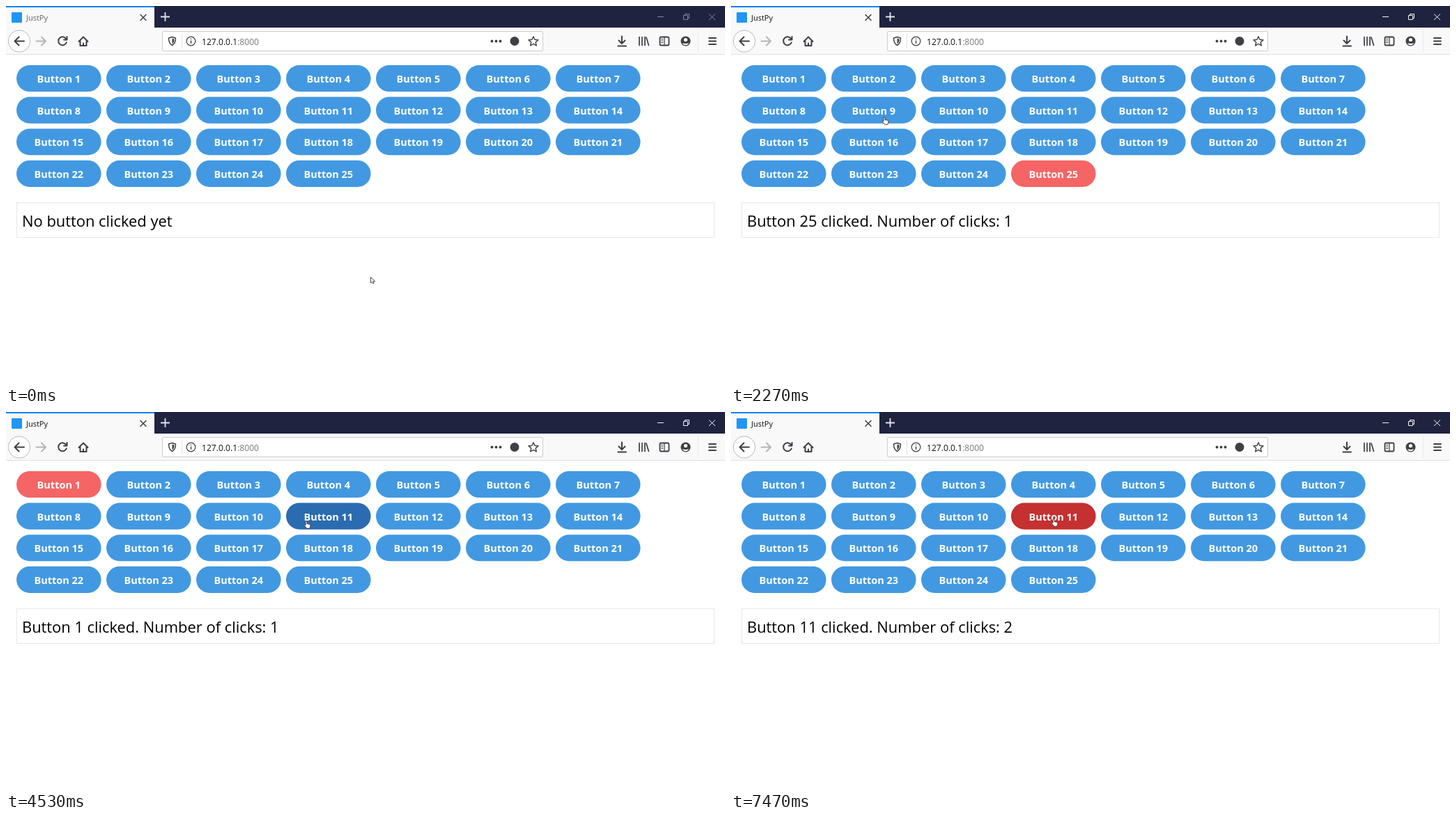
Write an HTML page that moves like this. It is 1032 by 543 pixels and loops after 8 s.

```html
<!DOCTYPE html>
<html lang="en">
<head>
<meta charset="utf-8">
<title>Buttons</title>
<style>
  html, body { margin: 0; width: 100%; height: 100%; overflow: hidden; background: #fff; }
  svg { display: block; width: 1032px; height: 543px; font-family: "Open Sans", "Noto Sans", sans-serif; }
  .icon { fill: none; stroke: #3f3f44; stroke-width: 2; stroke-linecap: round; stroke-linejoin: round; }
  .thin { stroke-width: 1.4; }
  .solid { fill: #3f3f44; }
  #buttons text { font-size: 14.5px; font-weight: 700; fill: #fff; text-anchor: middle; }
</style>
</head>
<body>
<svg viewBox="0 0 1032 543">
  <!-- tab strip -->
  <rect width="1032" height="31" fill="#202340"/>
  <rect width="213" height="31" fill="#f9f9fa"/>
  <rect width="213" height="2" fill="#0a84ff"/>
  <rect x="8" y="9" width="15" height="15" rx="1" fill="#2196f3"/>
  <text id="title" x="29" y="20.5" font-size="11">JustPy</text>
  <path class="icon" stroke-width="1.6" d="M193 12.5l8 8m0-8l-8 8" style="stroke-width:1.5"/>
  <path d="M222 15.5h13m-6.5-6.5v13" stroke="#e4e4ea" stroke-width="1.8"/>
  <g id="controls" fill="none">
    <path d="M935 15.5h9M1009 11.500l9 8.500m0-8.500l-9 8.500"/>
    <path d="M972.500 13.500h6v6h-6zM974.500 13.500v-2h6v6h-2"/>
  </g>

  <!-- toolbar -->
  <rect y="31" width="1032" height="38" fill="#f9f9fa"/>
  <path d="M0 69.500h1032" stroke="#e1e1e2"/>
  <circle cx="19" cy="50.500" r="15.700" fill="#fff" stroke="#b9b9bb"/>
  <path class="icon" d="M26 50.500H12.500m6-6l-6 6 6 6"/>
  <path class="icon" d="M43.500 50.500H57m-6-6l6 6-6 6" style="stroke:#b5b5b7"/>
  <path class="icon" d="M86.500 47.500a6 6 0 1 0 .3 5M87.500 44v4.500h-4.500"/>
  <path class="icon" d="M104.500 51l6.500-6.500 6.500 6.500M106.500 50v7h9v-7M111 57v-3.500"/>
  <rect x="224.500" y="36.500" width="546" height="28" rx="1.500" fill="#fff" stroke="#cccccf"/>
  <path class="icon thin" d="M238.500 44.500l5 1.500c0 5-1 8.500-5 10.500-4-2-5-5.500-5-10.500z"/>
  <path class="solid" d="M238.500 46.500l3 1c0 3.500-.7 5.500-3 7z"/>
  <path d="M252.500 40v21" stroke="#e3e3e5"/>
  <circle class="icon thin" cx="265.500" cy="50.500" r="6.300" style="stroke-width:1.200"/>
  <path class="icon thin" d="M265.500 50v3.500M265.500 47.300v.1"/>
  <text x="281" y="55.500" font-size="12.100" fill="#111">127.0.0.1<tspan fill="#77777b">:8000</tspan></text>
  <g class="solid">
    <circle cx="697.500" cy="50.500" r="1.900"/><circle cx="703.500" cy="50.500" r="1.900"/><circle cx="709.500" cy="50.500" r="1.900"/>
    <circle cx="730" cy="50.500" r="6.500"/>
  </g>
  <path class="icon thin" d="M757 43.800l2 4.500 5 .5-3.800 3.300 1.100 4.900-4.300-2.600-4.300 2.600 1.100-4.900-3.800-3.300 5-.5z"/>
  <path class="icon" d="M884 43.500v10m-4.500-4l4.500 4.500 4.500-4.500M878.500 57.500h11.500"/>
  <path class="icon" d="M909 44.500v12M913 44.500v12M917 44.500v12M919 45l3.500 11.500" style="stroke-width:1.700"/>
  <rect class="icon thin" x="938.500" y="44.500" width="13" height="12" rx="2" style="stroke-width:1.800"/>
  <path class="icon thin" d="M945 45v11M940.800 47.500h2M940.800 50h2M940.800 52.500h2" style="stroke-width:1.200"/>
  <circle class="solid" cx="975.500" cy="50.500" r="7"/>
  <circle cx="975.500" cy="48.500" r="2.600" fill="#f9f9fa"/>
  <path d="M970.800 53.200q4.700 1.600 9.400 0-1.500 3-4.700 3t-4.700-3z" fill="#f9f9fa"/>
  <path d="M993.500 35v31" stroke="#e9e9ea"/>
  <path class="icon" d="M1009 46h10M1009 50.500h10M1009 55h10" style="stroke-width:1.800"/>

  <!-- page -->
  <g id="buttons"></g>
  <rect x="15.500" y="282.500" width="1001" height="50" fill="#fff" stroke="#e6e8ec"/>
  <text id="result" x="23" y="317" font-size="21.900" fill="#000"></text>

  <g id="cursor" fill="#fff" stroke="#222" stroke-width=".8" stroke-linejoin="round">
    <path id="arrow" d="M.5 .5v8.500l2-1.800 1.300 2.600 1.300-.6-1.200-2.600h2.600z"/>
    <path id="hand" d="M-1 1q1-1.300 2 0v3.500l4 .8q1 .3 1 1.500c0 2-.8 2.500-1 4.500h-4.500c-.5-2-2.800-3-3.500-5 .5-1 1.300-.6 2 .4z"/>
  </g>
</svg>

<script>
const LOOP = 8000, FPS = 15, COUNT = 25, COLS = 7;
const LEFT = 15, TOP = 85, STEP_X = 129, STEP_Y = 45.6, WIDTH = 121.6, HEIGHT = 38.1;
const BLUE = ['#4299e1', '#2b6cb0'], RED = ['#f56565', '#c53030'];  // [idle, hovered]
const $ = id => document.getElementById(id);

const smooth = u => u * u * (3 - 2 * u);
const linear = u => u;
const out = u => 1 - (1 - u) ** 2;

// Pointer tip: [tick, x, y, easing into this point]
const path = [
  [4, 523, 389], [15, 465, 251, smooth], [17, 464, 247, out],
  [29, 464, 247], [34, 220, 159, linear], [42, 113, 96, out], [44, 114.5, 102.5, linear],
  [57, 114.5, 102.5], [68, 431, 156, smooth],
  [79, 431, 156], [87, 556, 148, smooth],
  [98, 556, 148], [106, 462.5, 153, smooth]
];
const clicks = [[23, 25], [49, 1], [74, 11], [95, 12], [112, 11]];  // [tick, button]
const FOCUS_TICK = 20;

const buttons = Array.from({ length: COUNT }, (_, i) => {
  const x = LEFT + i % COLS * STEP_X, y = TOP + Math.floor(i / COLS) * STEP_Y;
  $('buttons').insertAdjacentHTML('beforeend',
    `<rect x="${x}" y="${y}" width="${WIDTH}" height="${HEIGHT}" rx="${HEIGHT / 2}"/>` +
    `<text x="${x + WIDTH / 2}" y="${y + 25}">Button ${i + 1}</text>`);
  return $('buttons').lastChild.previousSibling;
});

function pointer(tick) {
  const i = path.findIndex(p => p[0] >= tick);
  if (i < 0) return path[path.length - 1].slice(1, 3);
  if (i === 0) return path[0].slice(1, 3);
  const [t0, x0, y0] = path[i - 1], [t1, x1, y1, ease = linear] = path[i];
  const u = ease((tick - t0) / (t1 - t0));
  return [x0 + (x1 - x0) * u, y0 + (y1 - y0) * u];
}

function buttonAt([x, y]) {
  const col = Math.floor((x - LEFT) / STEP_X), row = Math.floor((y - TOP) / STEP_Y);
  const inside = col >= 0 && col < COLS && row >= 0 &&
    x - LEFT - col * STEP_X <= WIDTH && y - TOP - row * STEP_Y <= HEIGHT;
  const n = row * COLS + col + 1;
  return inside && n <= COUNT ? n : 0;
}

function draw(ms) {
  const tick = Math.floor((ms % LOOP + 4) * FPS / 1000);
  const tip = pointer(tick), over = buttonAt(tip);
  const hovered = buttonAt(pointer(tick - 1));  // the page repaints one tick late
  const done = clicks.filter(c => c[0] <= tick).map(c => c[1]);
  const last = done[done.length - 1];

  buttons.forEach((b, i) =>
    b.setAttribute('fill', (i + 1 === last ? RED : BLUE)[+(i + 1 === hovered)]));
  $('result').textContent = last
    ? `Button ${last} clicked. Number of clicks: ${done.filter(n => n === last).length}`
    : 'No button clicked yet';

  const focused = tick >= FOCUS_TICK;
  $('title').setAttribute('fill', focused ? '#111' : '#66666a');
  $('controls').setAttribute('stroke', focused ? '#f4f4f6' : '#84859a');

  $('cursor').setAttribute('transform', `translate(${tip.map(Math.round)})`);
  $('arrow').style.display = over ? 'none' : '';
  $('hand').style.display = over ? '' : 'none';
}

const start = performance.now();
(function loop() {
  draw(performance.now() - start);
  requestAnimationFrame(loop);
})();
</script>
</body>
</html>
```
